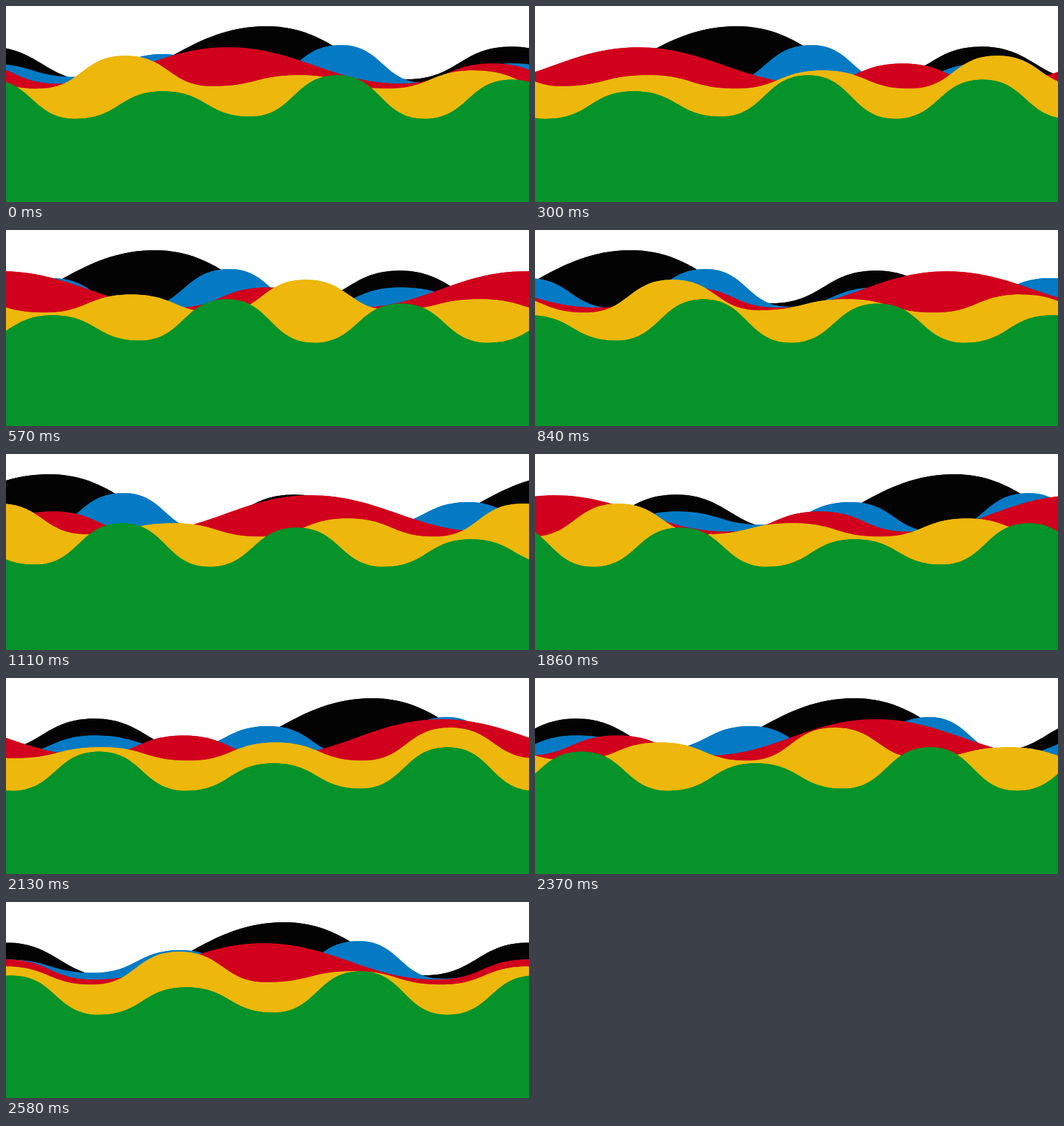
Write an HTML page with a canvas that moves like this. It is 750 px wide and 281 px high and loops after 2.61 s.

```html
<!DOCTYPE html>
<html lang="en">
<head>
<meta charset="utf-8">
<title>Waves</title>
<style>
  html, body { margin: 0; width: 100%; height: 100%; overflow: hidden; background: #fff; }
  canvas { display: block; }
</style>
</head>
<body>
<canvas id="stage" width="750" height="281"></canvas>
<script>
const W = 750, H = 281, STEP = 30, FRAMES = 87;
const ctx = document.getElementById('stage').getContext('2d');

// Evenly spaced crests and troughs over one width.
const even = (start, ...ys) => ys.map((y, i) => [start + i * W / ys.length, y]);

// Crests and troughs: [x, y, handle length]. A handle never passes the middle of its gap.
// A layer runs once across the stage in `cycle` frames; `hold` of them repeat its first pose.
const layers = [
  { color: '#030303', cycle: 90, hold: 1,
    pts: [[135, 109, 78], [373, 29, 108], [575, 105, 73], [725, 58.2, 73]] },
  { color: '#047ac4', cycle: 90, hold: 1,
    pts: [[100, 101.5], [225, 69], [350, 112], [480, 56], [600, 110], [725, 82.4]] },
  { color: '#d1001c', cycle: 45, hold: 1, reach: 98,
    pts: [[76, 111.3], [318, 59.2], [566, 111.3], [698, 82.4]] },
  { color: '#edb70b', cycle: 30, hold: 1,
    pts: even(46, 118.6, 71.2, 115.2, 99.3, 118.6, 92.5) },
  { color: '#05932a', cycle: 90, hold: 0,
    pts: even(100, 161.7, 122.3, 158.6, 99.2, 161.7, 105.4) }
];

// Smooth outline over three widths, filled down to the floor.
function wavePath({ pts, reach = W }) {
  const path = new Path2D();
  const all = [-W, 0, W].flatMap(dx => pts.map(([x, y, r = reach]) => [x + dx, y, r]));
  path.moveTo(all[0][0], H);
  path.lineTo(all[0][0], all[0][1]);
  for (let i = 1; i < all.length; i++) {
    const [x0, y0, r0] = all[i - 1];
    const [x1, y1, r1] = all[i];
    const half = (x1 - x0) / 2;
    path.bezierCurveTo(x0 + Math.min(r0, half), y0, x1 - Math.min(r1, half), y1, x1, y1);
  }
  path.lineTo(all[all.length - 1][0], H);
  path.closePath();
  return path;
}

for (const layer of layers) layer.path = wavePath(layer);

function draw(frame) {
  ctx.fillStyle = '#fff';
  ctx.fillRect(0, 0, W, H);
  for (const { color, cycle, hold, path } of layers) {
    const shift = (frame % cycle) * W / (cycle - hold) % W;
    ctx.fillStyle = color;
    for (const x of [-shift, W - shift]) {
      ctx.setTransform(1, 0, 0, 1, x, 0);
      ctx.fill(path);
    }
    ctx.setTransform(1, 0, 0, 1, 0, 0);
  }
}

const start = performance.now();
function tick() {
  const t = Math.max(0, performance.now() - start);
  draw(Math.floor(t / STEP) % FRAMES);
  requestAnimationFrame(tick);
}
tick();
</script>
</body>
</html>
```
